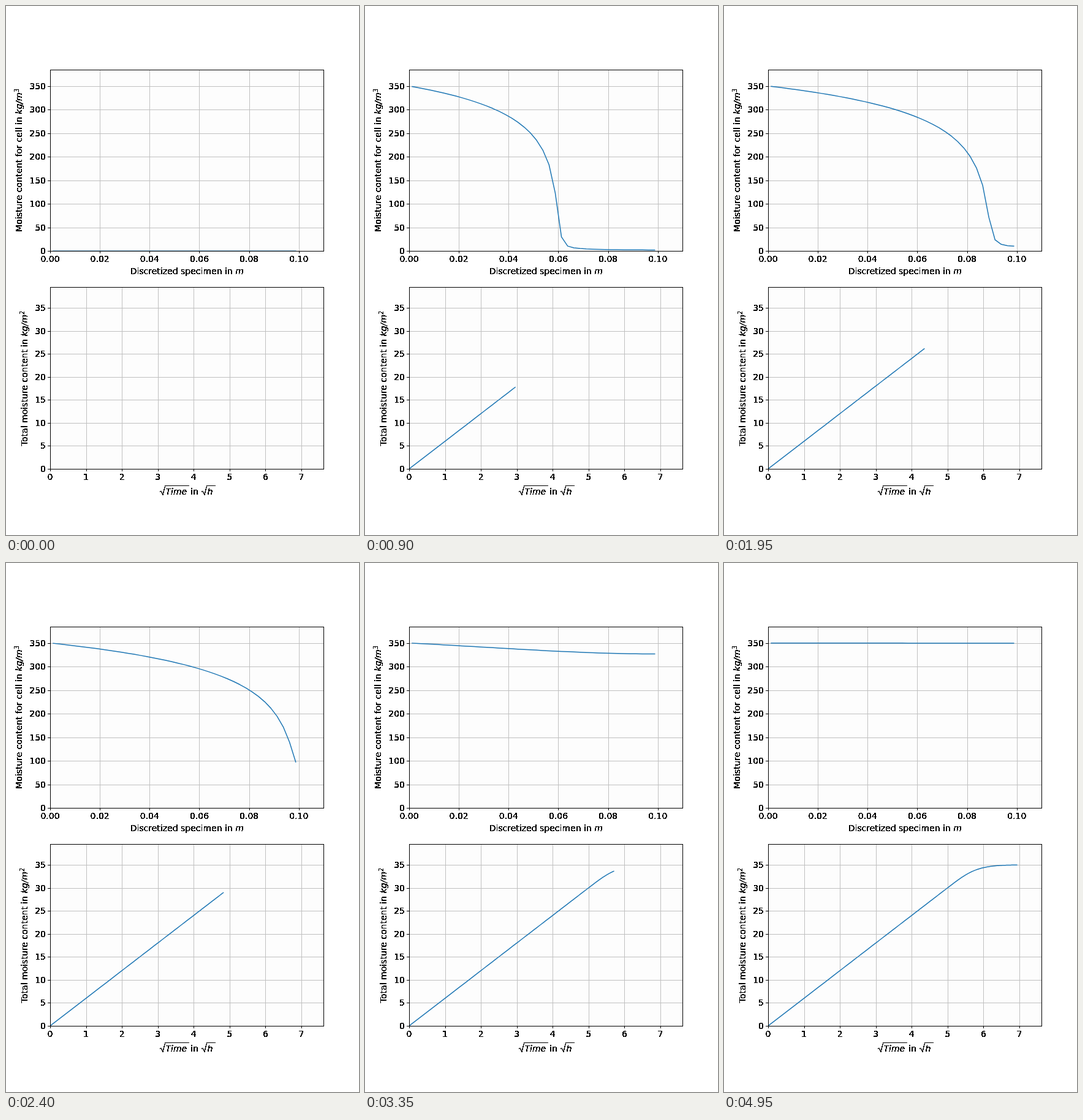
An HTML page with a canvas that plays this animation: 576 px wide and 864 px high, repeating every 5.05 s.

```html
<!DOCTYPE html>
<html lang="en">
<head>
<meta charset="utf-8">
<title>Capillary moisture uptake</title>
<style>
html, body { margin: 0; width: 576px; height: 864px; overflow: hidden; background: #fff; }
canvas { display: block; }
</style>
</head>
<body>
<canvas id="stage" width="576" height="864"></canvas>
<script>
const W = 576, H = 864, FRAMES = 100, STEP_MS = 50, LOOP_MS = 5050, HOURS = 48;
const ctx = document.getElementById('stage').getContext('2d');

const LEFT = 72, RIGHT = 518.4;
const profileAxes = { top: 103.68, bottom: 400.19, xMax: 0.11, yMax: 385 };
const totalAxes = { top: 459.49, bottom: 756, xMax: 1.1 * Math.sqrt(HOURS), yMax: 39.46 };

const px = (a, x) => LEFT + x / a.xMax * (RIGHT - LEFT);
const py = (a, y) => a.bottom - y / a.yMax * (a.bottom - a.top);
const snap = v => Math.floor(v + 0.5) + 0.5;
const range = (n, step) => Array.from({ length: n }, (_, i) => i * step);

// Moisture transport through a row of cells wetted at the left end:
// exponential liquid diffusivity plus a weak vapour flow in the dry part.
function simulate() {
  const cells = 40, dx = 0.1 / cells, full = 350, beta = Math.log(1000);
  const liquid = 0.00109 * full / beta, vapour = 0.002, dry = 1.5;
  const potential = w => liquid * Math.exp(beta * (w / full - 1)) - vapour / (w + dry);
  const steps = 400, dt = HOURS / (FRAMES - 1) / steps;
  const w = new Float64Array(cells), p = new Float64Array(cells);
  const wet = potential(full);
  const frames = [];
  for (let k = 0; k < FRAMES; k++) {
    frames.push({
      root: Math.sqrt(k * HOURS / (FRAMES - 1)),
      total: w.reduce((sum, v) => sum + v, 0) * dx,
      profile: Array.from(w, (v, i) => [(i + 0.5) * dx, v])
    });
    for (let s = 0; s < steps; s++) {
      for (let i = 0; i < cells; i++) p[i] = potential(w[i]);
      let inflow = (wet - p[0]) / (dx / 2);
      for (let i = 0; i < cells; i++) {
        const outflow = i < cells - 1 ? (p[i] - p[i + 1]) / dx : 0;
        w[i] += (inflow - outflow) * dt / dx;
        inflow = outflow;
      }
    }
  }
  return frames;
}

function makeLayer(draw) {
  const canvas = document.createElement('canvas');
  canvas.width = W;
  canvas.height = H;
  draw(canvas.getContext('2d', { willReadFrequently: true }));
  return canvas;
}

function segment(g, x1, y1, x2, y2) {
  g.beginPath();
  g.moveTo(x1, y1);
  g.lineTo(x2, y2);
  g.stroke();
}

const xTicks = a => a === profileAxes ? range(6, 0.02) : range(8, 1);
const yTicks = a => a === profileAxes ? range(8, 50) : range(8, 5);

function drawGrid(g) {
  g.fillStyle = '#fff';
  g.fillRect(0, 0, W, H);
  for (const a of [profileAxes, totalAxes]) {
    const top = Math.round(a.top), bottom = Math.round(a.bottom);
    g.fillStyle = '#fdfdfd';
    g.fillRect(LEFT, top, 446, bottom - top);
    g.strokeStyle = '#c0c0c0';
    for (const v of xTicks(a)) segment(g, snap(px(a, v)), top, snap(px(a, v)), bottom);
    for (const v of yTicks(a)) segment(g, LEFT, snap(py(a, v)), 518, snap(py(a, v)));
  }
}

const font = (size = 14, style = '') => `${style} ${size}px "DejaVu Sans", sans-serif`;

// Runs are [text, style, size, rise], set side by side and centred on x.
function drawRuns(g, x, y, runs) {
  g.textAlign = 'left';
  const widths = runs.map(([text, style, size]) => {
    g.font = font(size, style);
    return g.measureText(text).width;
  });
  x -= widths.reduce((a, b) => a + b) / 2;
  runs.forEach(([text, style, size, rise = 0], i) => {
    g.font = font(size, style);
    g.fillText(text, x, y - rise);
    x += widths[i];
  });
}

function drawVertical(g, x, y, runs) {
  g.save();
  g.translate(x, y);
  g.rotate(-Math.PI / 2);
  drawRuns(g, 0, 0, runs);
  g.restore();
}

function drawRoot(g, x, text, barEnd) {
  g.lineWidth = 1;
  g.beginPath();
  [[0, 793.5], [2, 792.3], [4.8, 798.5], [8.8, 783.5]].forEach(([dx, y]) => g.lineTo(x + dx, y));
  g.lineTo(barEnd, 783.5);
  g.stroke();
  g.font = font(14, 'oblique');
  g.fillText(text, x + 9.5, 798);
}

function drawLabels(g) {
  for (const a of [profileAxes, totalAxes]) {
    const top = snap(a.top), bottom = snap(a.bottom);
    g.font = font();
    g.textAlign = 'center';
    for (const v of xTicks(a)) {
      const x = px(a, v);
      segment(g, snap(x), bottom, snap(x), bottom + 3.5);
      g.fillText(a === profileAxes ? v.toFixed(2) : v, x, Math.round(a.bottom + 17.6));
    }
    g.textAlign = 'right';
    for (const v of yTicks(a)) {
      const y = snap(py(a, v));
      segment(g, LEFT - 3.5, y, LEFT, y);
      g.fillText(v, 65, Math.round(py(a, v) + 5));
    }
    g.strokeRect(72.5, top, 446, bottom - top);
  }
  drawRuns(g, 295.2, 438, [['Discretized specimen in '], ['m', 'oblique']]);
  const unit = power => [['kg/m', 'oblique'], [power, '', 9.8, 5.3]];
  drawVertical(g, 26, 252, [['Moisture content for cell in '], ...unit('3')]);
  drawVertical(g, 35, 608, [['Total moisture content in '], ...unit('2')]);
  g.textAlign = 'left';
  drawRoot(g, 251, 'Time', 298.5);
  g.font = font();
  g.fillText('in', 301, 798);
  drawRoot(g, 319, 'h', 341.5);

  // Hard-edged black lettering without smoothing.
  const image = g.getImageData(0, 0, W, H), data = image.data;
  for (let i = 3; i < data.length; i += 4) data[i] = data[i] > 60 ? 255 : 0;
  g.putImageData(image, 0, 0);
}

function drawCurve(a, points) {
  ctx.save();
  ctx.beginPath();
  ctx.rect(LEFT, a.top, RIGHT - LEFT, a.bottom - a.top);
  ctx.clip();
  ctx.strokeStyle = '#1f77b4';
  ctx.lineWidth = 1.5;
  ctx.lineJoin = 'round';
  ctx.lineCap = 'square';
  ctx.beginPath();
  for (const [x, y] of points) ctx.lineTo(px(a, x), py(a, y));
  ctx.stroke();
  ctx.restore();
}

const frames = simulate();
const totals = frames.map(f => [f.root, f.total]);
const grid = makeLayer(drawGrid), labels = makeLayer(drawLabels);
const start = performance.now();

function render() {
  const t = (performance.now() - start) % LOOP_MS;
  const k = Math.min(FRAMES - 1, Math.floor(t / STEP_MS));
  ctx.drawImage(grid, 0, 0);
  drawCurve(profileAxes, frames[k].profile);
  if (k > 0) drawCurve(totalAxes, totals.slice(0, k + 1));
  ctx.drawImage(labels, 0, 0);
  requestAnimationFrame(render);
}
render();
</script>
</body>
</html>
```
